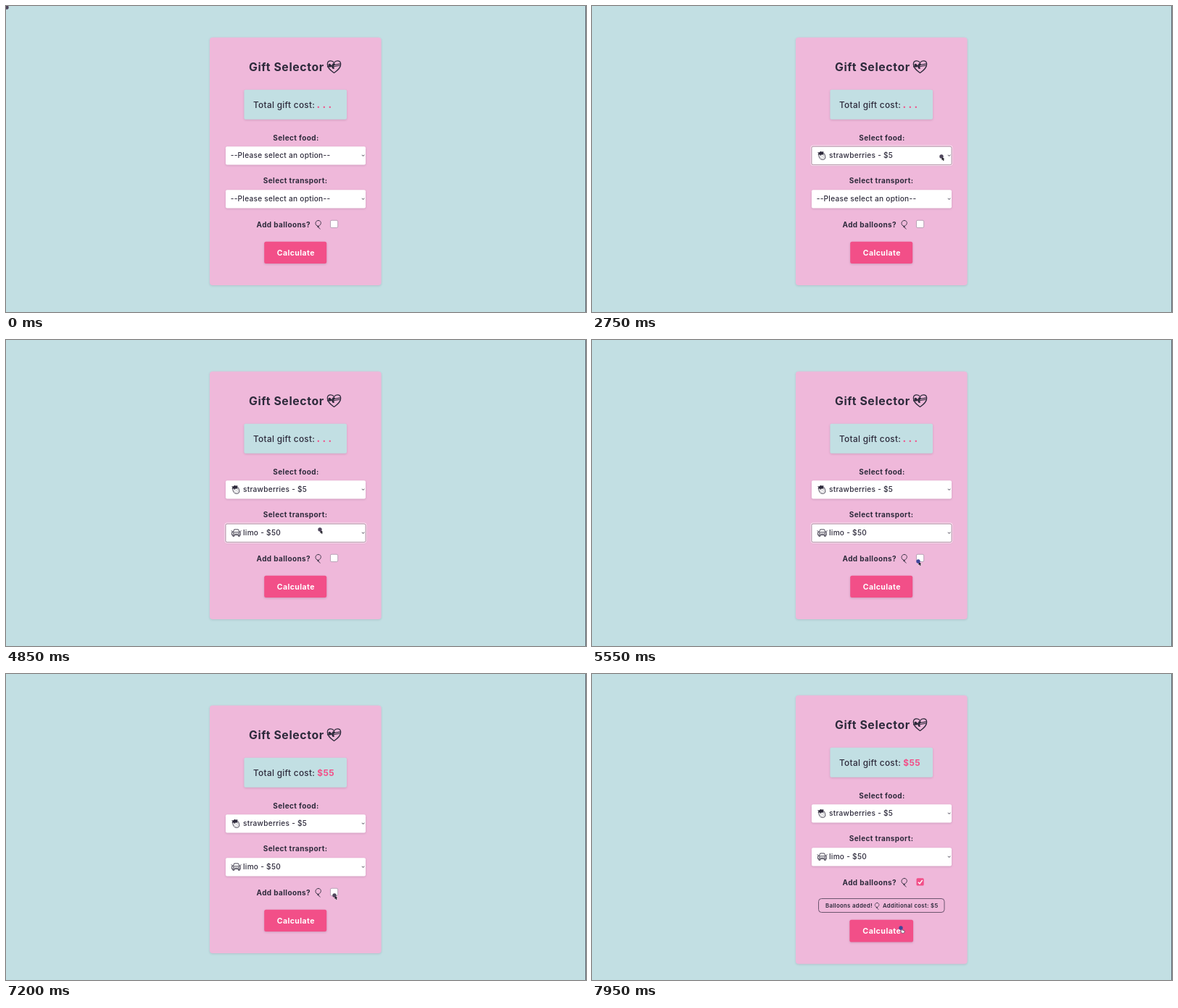
An HTML page with a canvas for the animation above (8 s loop, 800 px wide and 423 px high).

```html
<!DOCTYPE html>
<html lang="en">
<head>
<meta charset="utf-8">
<title>Gift Selector</title>
<style>
html, body { margin: 0; width: 100%; height: 100%; overflow: hidden; background: #c2dfe3; }
canvas { display: block; width: 800px; height: 423px; }
</style>
</head>
<body>
<canvas id="stage" width="800" height="423"></canvas>
<script>
const ctx = document.getElementById('stage').getContext('2d');
const LOOP = 8000;
const SKY = '#c2dfe3', CARD = '#efb8da', HOT = '#f24f88', INK = '#2d2a3b';

// pointer stops: time, x, y
const path = [
  [250, 690, 12], [600, 585, 110], [1000, 483, 205], [1100, 484, 206], [1250, 482, 208],
  [2750, 482, 208], [3000, 452, 238], [3250, 433, 260], [3400, 433, 262],
  [4850, 433, 262], [4900, 422, 299], [5050, 422, 299], [5200, 449, 306],
  [5550, 450, 306], [5800, 432, 327], [6050, 423, 336],
  [6600, 423, 336], [6900, 441, 320], [7200, 453, 306],
  [7750, 453, 306], [7950, 426, 351]
];

function pointer(t) {
  if (t < 250) return [1, 2];
  for (let i = 1; i < path.length; i++) {
    const [t0, x0, y0] = path[i - 1], [t1, x1, y1] = path[i];
    if (t < t1) {
      const k = (t - t0) / (t1 - t0);
      return [x0 + (x1 - x0) * k, y0 + (y1 - y0) * k];
    }
  }
  return path[path.length - 1].slice(1);
}

function box(x, y, w, h, r, fill, shadow) {
  ctx.save();
  if (shadow) {
    ctx.shadowColor = `rgba(60,40,70,${shadow})`;
    ctx.shadowBlur = 3;
    ctx.shadowOffsetY = 1;
  }
  ctx.fillStyle = fill;
  ctx.beginPath();
  ctx.roundRect(x, y, w, h, r);
  ctx.fill();
  ctx.restore();
}

function outline(x, y, w, h, r, color, width = 1) {
  ctx.strokeStyle = color;
  ctx.lineWidth = width;
  ctx.beginPath();
  ctx.roundRect(x, y, w, h, r);
  ctx.stroke();
}

function text(str, x, y, size, weight, color = INK) {
  ctx.font = `${weight} ${size}px Inter, "Open Sans", sans-serif`;
  ctx.letterSpacing = size * (weight > 500 ? .039 : .027) + 'px';
  ctx.fillStyle = color;
  ctx.fillText(str, x, y);
}

function icon(x, y, scale, draw) {
  ctx.save();
  ctx.translate(x, y);
  ctx.scale(scale, scale);
  ctx.strokeStyle = ctx.fillStyle = INK;
  ctx.lineWidth = .9;
  ctx.lineCap = ctx.lineJoin = 'round';
  draw();
  ctx.restore();
}

const stroke = d => ctx.stroke(new Path2D(d));
const fill = d => ctx.fill(new Path2D(d));

function heart() {
  ctx.lineWidth = 1.2;
  stroke('M10 17.5C4 13 .8 10 .8 5.500C.8 0 7.500 -.5 10 3.500C12.500 -.5 19.200 0 19.200 5.500C19.200 10 16 13 10 17.500Z');
  stroke('M1 8.800L6 8M8 7L19 4.800M8 9L19 7');
  fill('M6.800 7.400C5 4 1.800 4 2 7C2 10 5 10.200 6.800 8.800C7 11 8 12.500 10 11.800C11 11 9.800 9.500 8.800 8.300C11.500 7 12 5 10.500 4.200C8.500 3.500 7.300 5.500 6.800 7.400Z');
}

function balloon() {
  stroke('M5 .5C8 .5 9 3 8.500 5C8 7 6 8.500 4.500 8.500C2.500 8.500 1 6.500 1 4.500C1 2 2.800 .5 5 .5ZM4.500 8.500L3.800 9.800L5.600 9.800L4.500 8.500M5 10C4.500 11.500 7 11 7.500 12.500');
}

function strawberry() {
  stroke('M2.500 4.500C1.800 7 3.500 11 5.500 12C8 13 11.500 12.500 11.800 10C12 7 11 3.500 9 2.500');
  fill('M.5 2L3.500 1.800L5 .2L6.500 1L9.500 .8L8.800 3L9.500 5.800L6.800 5L4.800 7L4 5L1 5.800L2.200 3.600Z');
  for (const [x, y] of [[4.5, 8.5], [6.5, 10.5], [9, 9.5], [9, 6.5], [7, 7.5]]) ctx.fillRect(x, y, .8, .8);
}

function limo() {
  stroke('M3 5L4.500 1.500L10.500 1.500L12 5M1.500 5.500L13.500 5.500L13.500 9.500L1.500 9.500ZM.5 3.500L2 4.500M14.500 3.500L13 4.500M5.500 8L9.500 8');
  stroke('M2.500 9.500L2.500 11.500L4.500 11.500L4.500 9.500M10.500 9.500L10.500 11.500L12.500 11.500L12.500 9.500');
  ctx.fillRect(2.8, 6.6, 1.7, 1.5);
  ctx.fillRect(10.5, 6.6, 1.7, 1.5);
}

function select(y, choice, draw, focused) {
  box(303, y + .2, 193, 25.2, 2, '#fff', .18);
  if (focused) {
    outline(301.8, y - 1, 195.2, 27.6, 3, '#fbe6f2');
    outline(303, y + .2, 193, 25.2, 2, '#a58a9c', .8);
  }
  if (draw) {
    icon(310.5, y + 6.5, .95, draw);
    text(choice, 327, y + 16, 10.1, 500);
  } else {
    text('--Please select an option--', 309.7, y + 16, 10.1, 500);
  }
  ctx.strokeStyle = INK;
  ctx.lineWidth = .9;
  ctx.beginPath();
  ctx.moveTo(490.9, y + 11.8);
  ctx.lineTo(492.6, y + 13.4);
  ctx.lineTo(494.3, y + 11.8);
  ctx.stroke();
}

function checkbox(y, checked) {
  box(447.5, y, 10.2, 10.2, 1.6, checked ? HOT : '#fff');
  if (!checked) return outline(447.5, y, 10.2, 10.2, 1.6, '#a08a9f', .7);
  ctx.strokeStyle = '#fff';
  ctx.lineWidth = 1.5;
  ctx.beginPath();
  ctx.moveTo(449.8, y + 5.4);
  ctx.lineTo(452, y + 7.6);
  ctx.lineTo(455.7, y + 2.6);
  ctx.stroke();
}

function button(y, hover) {
  ctx.save();
  ctx.translate(399.2, y + 15.2);
  const s = hover ? 1.02 : 1;
  ctx.scale(s, s);
  box(-43, -15.2, 86, 30.2, 2.5, HOT, .2);
  text('Calculate', -25.4, 3.9, 10.5, 700, '#fff');
  ctx.restore();
}

function cursor(x, y, kind, color) {
  ctx.save();
  ctx.translate(x, y);
  ctx.lineWidth = .7;
  if (kind === 'arrow') {
    ctx.fillStyle = '#15131c';
    ctx.strokeStyle = '#fff';
    const p = new Path2D('M.5 0L.5 5.300L1.700 4.300L2.600 6.200L3.600 5.700L2.700 4L4.200 3.900Z');
    ctx.stroke(p);
    ctx.fill(p);
  } else if (kind === 'hand') {
    ctx.fillStyle = '#fff';
    ctx.strokeStyle = '#4a4058';
    const p = new Path2D('M.5 1L1.500 1L2.200 3.200L5 3.800L5 6L4.200 7.200L1.500 7.200L-.5 4.600L.6 4.300Z');
    ctx.fill(p);
    ctx.stroke(p);
  }
  ctx.fillStyle = color;
  ctx.beginPath();
  ctx.arc(0, 0, 2.7, 0, Math.PI * 2);
  ctx.fill();
  ctx.restore();
}

function draw(t) {
  const added = t >= 7300, lift = added ? -14 : 0;
  const [px, py] = pointer(t);
  const buttonY = added ? 340 : 325.7;
  const over = (x, y, w, h) => px >= x && px <= x + w && py >= y && py <= y + h;
  const onButton = over(356, buttonY, 86, 31);
  const onBox = over(446, 295 + lift, 13, 13);

  ctx.fillStyle = SKY;
  ctx.fillRect(0, 0, 800, 423);
  ctx.fillStyle = '#626b75';
  ctx.fillRect(799, 0, 1, 423);
  box(281, 43.4 + lift, 236.6, added ? 371.3 : 342.6, 4, CARD, .15);

  ctx.save();
  ctx.translate(0, lift);
  text('Gift Selector', 335, 89.6, 15.8, 700);
  icon(442.5, 75, 1, heart);

  box(328.4, 115.7, 141.6, 41, 2, SKY, .18);
  text('Total gift cost:', 341, 140.5, 11.8, 500);
  if (t >= 5950) text('$55', 429.2, 140.5, 11.8, 700, HOT);
  else text('. . .', 428.5, 140.5, 12.4, 900, HOT);

  text('Select food:', 368.3, 185.6, 10, 700);
  select(194, 'strawberries - $5', t >= 2750 && strawberry, t >= 2750 && t < 3400);
  text('Select transport:', 354.8, 245.4, 10, 700);
  select(254, 'limo - $50', t >= 4850 && limo, t >= 4850 && t < 5900);
  text('Add balloons?', 345.5, 306, 10, 700);
  icon(426, 296, .97, balloon);
  checkbox(296.3, added);
  ctx.restore();

  if (added) {
    outline(312.5, 310.5, 173.5, 19, 4, '#5d4a63', .9);
    text('Balloons added!', 322, 323.1, 7.8, 600);
    icon(389.5, 316, .75, balloon);
    text('Additional cost: $5', 401, 323.1, 7.8, 600);
  }
  button(buttonY, onButton);

  const kind = t < 250 ? '' : onButton ? 'hand' : 'arrow';
  const active = onButton || (onBox && t < 6600) || (t >= 1000 && t < 2750);
  cursor(px, py, kind, active ? '#40479a' : '#4f465c');
}

function frame(now) {
  draw(Math.floor((now % LOOP) / 50) * 50);
  requestAnimationFrame(frame);
}
requestAnimationFrame(frame);
</script>
</body>
</html>
```
